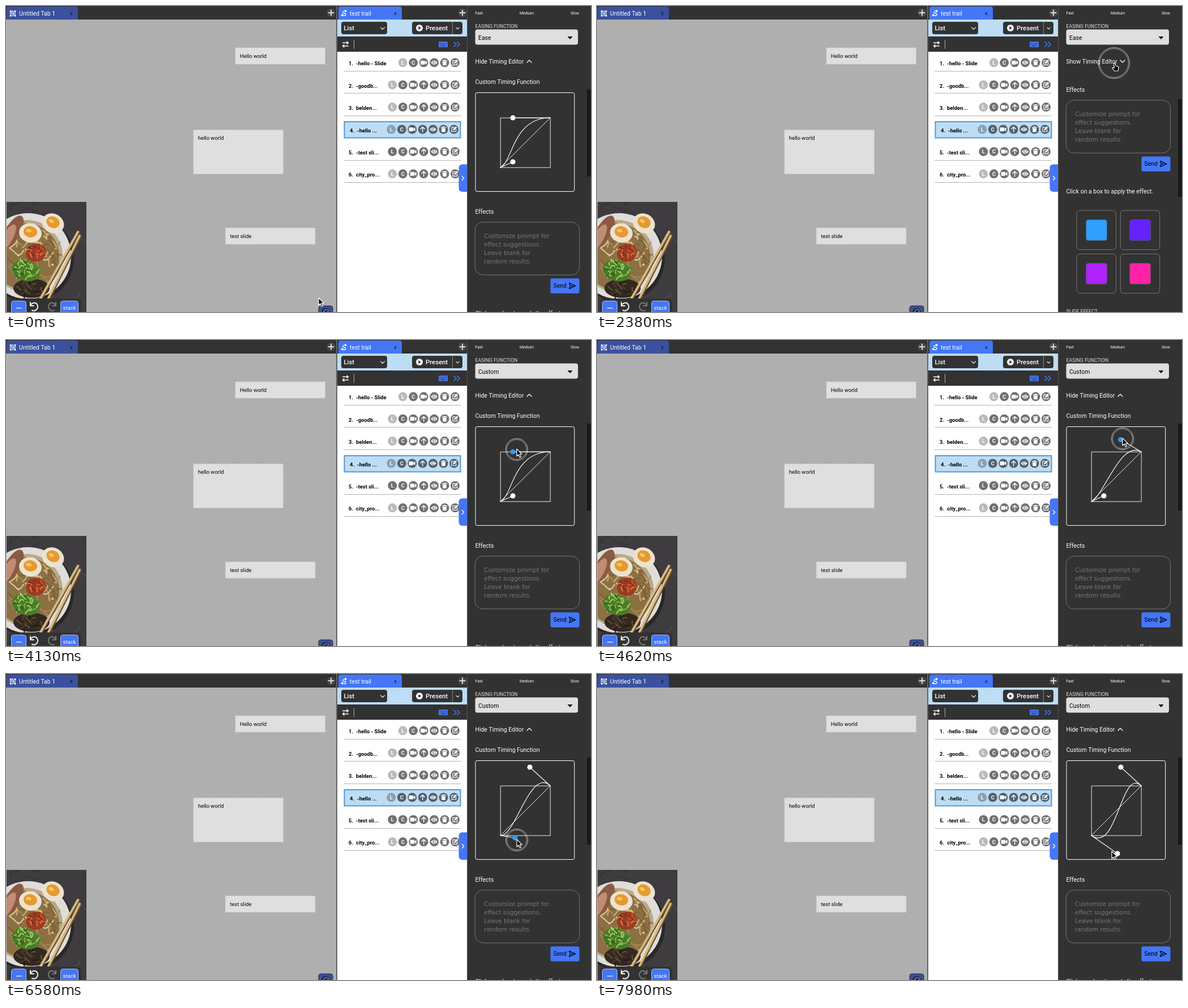
An HTML page with a canvas that plays this animation: 1033 by 542 pixels, repeating every 8000 ms.

```html
<!DOCTYPE html>
<html lang="en">
<head>
<meta charset="utf-8">
<title>Timing editor</title>
<style>
html, body { margin: 0; width: 100%; height: 100%; overflow: hidden; background: #323232; }
canvas { display: block; }
</style>
</head>
<body>
<canvas id="stage" width="1033" height="542"></canvas>
<script>
const ctx = document.getElementById('stage').getContext('2d');
const LOOP = 8000, STEP = 70;
const DARK = '#323232', BLUE = '#4476f7', PALE = '#bdddf5', DOC = '#dfdfdf';

const move = (from, to, x, y) => ({ from, to, x, y });
const press = (from, to, r = 20) => ({ from, to, r });
const during = (span, t) => t >= span.from && t < span.to;

// Each move glides from wherever the pointer rests to its own end point.
const MOVES = [
  move(0, 70, 731, 400), move(140, 840, 915, 130), move(1320, 1610, 909, 101), move(1820, 2100, 913, 100),
  move(2800, 3150, 936, 135), move(3150, 3640, 896, 197), move(4060, 4900, 932, 171), move(4900, 5320, 926, 164),
  move(5530, 5740, 897, 293), move(5950, 6230, 897, 274), move(6440, 6580, 902, 293), move(6580, 7280, 921, 316),
  move(7910, 7980, 909, 314)
];
const DRAG_END = press(3850, 5460), DRAG_START = press(6300, 7630);
const COLLAPSED = { from: 1890, to: 2520 };
const PRESSES = [press(980, 1120), press(1750, 1890, 28), press(2310, 2590, 28), DRAG_END, DRAG_START];

const easeOut = p => 1 - (1 - p) ** 2;

function pointerAt(t) {
  let x = 552, y = 517;
  for (const m of MOVES) {
    if (t <= m.from) break;
    const p = easeOut(Math.min(1, (t - m.from) / (m.to - m.from)));
    x += (m.x - x) * p;
    y += (m.y - y) * p;
  }
  return [x, y];
}

// A dragged handle trails the pointer by one step and stays where it was let go.
function handleAt(t, drag, dx, dy) {
  const [x, y] = pointerAt(Math.max(drag.from, Math.min(drag.to, t)) - STEP);
  return [x + dx, y + dy];
}

let seed = 1;
function rand(a, b) {
  seed = (seed * 16807) % 2147483647;
  return a + (b - a) * seed / 2147483647;
}

function rect(x, y, w, h, fill) {
  ctx.fillStyle = fill;
  ctx.fillRect(x, y, w, h);
}

function box(x, y, w, h, r, fill, stroke, width = 1) {
  ctx.beginPath();
  ctx.roundRect(x, y, w, h, r);
  if (fill) { ctx.fillStyle = fill; ctx.fill(); }
  if (stroke) { ctx.strokeStyle = stroke; ctx.lineWidth = width; ctx.stroke(); }
}

function oval(x, y, rx, ry, fill, angle = 0) {
  ctx.beginPath();
  ctx.ellipse(x, y, rx, ry, angle, 0, 7);
  ctx.fillStyle = fill;
  ctx.fill();
}

const disc = (x, y, r, fill) => oval(x, y, r, r, fill);

function ring(x, y, r, color) {
  ctx.beginPath();
  ctx.arc(x, y, r, 0, 7);
  ctx.strokeStyle = color;
  ctx.lineWidth = 1;
  ctx.stroke();
}

// Strokes and/or fills an SVG path placed at x, y
function icon(d, x, y, stroke, width = 1.5, fill) {
  ctx.save();
  ctx.translate(x, y);
  ctx.lineCap = ctx.lineJoin = 'round';
  const path = new Path2D(d);
  if (fill) { ctx.fillStyle = fill; ctx.fill(path); }
  if (stroke) { ctx.strokeStyle = stroke; ctx.lineWidth = width; ctx.stroke(path); }
  ctx.restore();
}

// y is the middle of the capitals
function text(s, x, y, size = 10.45, color = '#fff', weight = 400, family = 'Roboto') {
  ctx.font = `${weight} ${size}px ${family}, sans-serif`;
  ctx.fillStyle = color;
  ctx.fillText(s, x, y + size * 0.355);
}

// Short random strokes spread over an ellipse
function strands(count, x, y, rx, ry, length, colors) {
  for (let i = 0; i < count; i++) {
    const a = rand(0, 6.28), d = Math.sqrt(rand(0, 1)), bend = rand(-length, length) / 2;
    icon(`M0 0 q${bend} ${bend} ${rand(-length, length)} ${rand(-length, length)}`,
      x + Math.cos(a) * rx * d, y + Math.sin(a) * ry * d, colors[i % colors.length], 2);
  }
}

function photo() {
  seed = 7;
  ctx.save();
  ctx.beginPath();
  ctx.rect(1, 347, 141, 195);
  ctx.clip();
  rect(1, 347, 141, 195, '#3f3c40');
  strands(40, 72, 440, 100, 110, 18, ['#343236', '#4d4a4d', '#3a373b']);
  disc(42, 447, 78, '#29272a');
  disc(39, 443, 76, '#dfddd9');
  disc(36, 443, 64, '#b8a98a');
  disc(35, 444, 59, '#8c7044');
  strands(70, 45, 440, 48, 50, 18, ['#cdb47c', '#a58a56', '#e0cd9c', '#7d5f36']);
  oval(12, 400, 13, 32, '#8a5a44', 0.5);
  oval(3, 410, 9, 26, '#c08c72', 0.5);
  for (const [x, y, tilt] of [[43, 402, 0.2], [83, 385, 0.5]]) {
    oval(x, y, 20, 17, '#ece2d0', tilt);
    oval(x, y - 2, 12, 10, '#e59a30', tilt);
    oval(x - 3, y - 4, 5, 3, '#f8c465', tilt);
  }
  oval(53, 437, 18, 16, '#9c3c22', -0.4);
  strands(16, 53, 437, 14, 12, 9, ['#c9552d', '#7c2a19', '#d97a46']);
  oval(45, 500, 32, 17, '#33291f');
  strands(16, 45, 500, 26, 12, 10, ['#4d3c2a', '#211b16', '#65533e']);
  oval(35, 469, 25, 18, '#4a7a2a', 0.3);
  strands(40, 36, 468, 24, 17, 9, ['#86bb45', '#315f20', '#a6d265', '#578c30']);
  icon('M128 401 L60 522 M131 408 L74 522', 0, 0, '#6b5030', 5.5);
  icon('M127 400 L59 521 M130 407 L73 521', 0, 0, '#d9bb80', 3.8);
  ctx.restore();
}

function tab(x, w, fill, label, labelX) {
  box(x, 1, w, 23, [4, 4, 0, 0], fill);
  text(label, labelX, 13);
  text('x', x + w - 14, 13, 9.5, '#111');
}

function plus(x) {
  disc(x, 12, 7.5, '#484848');
  icon('M-4.5 0 H4.5 M0 -4.5 V4.5', x, 12, '#ddd', 2);
}

function note(s, x, y, h) {
  box(x, y, 158.5, h, 0, DOC, '#cfcfcf', 0.6);
  text(s, x + 8, y + 14.5, 9.4, '#000');
}

function toolButton(x, w) {
  box(x, 522.5, w, 30, 4, BLUE, '#a9c3ff');
}

function leftPane() {
  rect(0, 24, 583, 518, '#afafaf');
  for (let y = 51; y < 542; y += 39.7)
    for (let x = 7.5; x < 580; x += 39.7) rect(Math.round(x), Math.round(y), 1, 1, '#858585');

  tab(1, 126, '#3b519f', 'Untitled Tab 1', 23);
  icon('M-4 -4 H4 V4 H-4Z M-2 -2 H1 V1 H-2Z M0 2 H2 V-1', 12, 13, '#fff', 1);
  for (const x of [7, 15]) for (const y of [8, 16]) rect(x, y, 2.5, 2.5, '#fff');
  plus(574);

  note('Hello world', 405, 74, 29);
  note('hello world', 331, 219.5, 78);
  note('test slide', 387.5, 393, 29);

  photo();
  box(5, 518, 128, 40, 8, DARK);
  toolButton(9.5, 26);
  rect(18, 534.5, 10, 1.2, '#fff');
  const undo = 'M-7 -8 V-2 H-1 M-7 -3 Q-3 -8 2 -7 A7 7 0 1 1 -4 6';
  icon(undo, 50, 533, '#eee', 2);
  ctx.save();
  ctx.scale(-1, 1);
  icon(undo, -81, 533, '#777', 2);
  ctx.restore();
  toolButton(96.5, 31);
  text('stack', 100.5, 535, 9.5);

  box(552, 531, 25, 20, 4, '#3a4e92', '#2b3147');
  disc(565, 543, 8, '#20283f');
  icon('M-5 0 Q-2 -7 4 -5 M1 0 L6 -4', 565, 543, '#6d98ff', 1.2);
}

const GLYPHS = {
  video: [['M-5 -3 H1.5 V3 H-5Z M2.5 -1 L5 -2.7 V2.7 L2.5 1Z', '#fff', 0.8, '#fff']],
  up: [['M0 4.5 V-4 M-3.6 -0.7 L0 -4.3 L3.6 -0.7', '#fff', 1.4]],
  eye: [['M-5.5 0 Q0 -7 5.5 0 Q0 7 -5.5 0Z', '#fff', 0.5, '#fff'], ['M-2.2 0 a2.2 2.2 0 1 0 4.4 0 a2.2 2.2 0 1 0 -4.4 0Z', '#666', 1]],
  trash: [['M-4.2 -3.6 H4.2 M-1.2 -4.6 H1.2', '#fff', 1.2], ['M-3.3 -2 H3.3 L2.8 4.5 H-2.8Z', '#fff', 0.5, '#fff']],
  edit: [['M1 -3.6 H-4 V4 H3.6 V0', '#fff', 1.2], ['M-1.5 1.5 L-1 -0.8 L3.4 -5 L5 -3.3 L0.8 1Z', '#fff', 0.5, '#fff']]
};

function badge(kind, x, y, alpha) {
  disc(x, y, 8, `rgba(0,0,0,${alpha})`);
  if (kind.length === 1) {
    ctx.textAlign = 'center';
    text(kind, x, y, 9.5, '#fff', 700);
    ctx.textAlign = 'left';
  } else for (const [d, stroke, width, fill] of GLYPHS[kind]) icon(d, x, y, stroke, width, fill);
}

function trailRow(name, i) {
  const y = 100.7 + i * 39.4, picked = i === 3, shift = picked ? 2 : 0;
  if (picked) box(597.5, 205, 205, 28.5, 0, PALE, '#5799cf', 2);
  else rect(596, Math.round(y + 14.2), 207, 1, '#b3b3b3');
  text(`${i + 1}.`, 605 + shift, y + 1.4, 9.4, '#000', 700);
  text(name, 618 + shift, y + 1.4, 9.4, '#000', 700);
  const kinds = ['L', 'C', 'video', 'up', 'eye', 'trash', 'edit'].filter(k => i || k !== 'up');
  kinds.reverse().forEach((kind, n) =>
    badge(kind, 793 - shift - n * 18.45, y - 0.4, kind === 'L' && i !== 4 ? 0.27 : 0.56));
}

function trailPane() {
  rect(583, 0, 2, 542, '#646464');
  rect(585, 24, 229, 30, PALE);
  rect(585, 54, 229, 27, DARK);
  rect(585, 81, 229, 461, '#fff');
  tab(587, 112, BLUE, 'test trail', 607);
  disc(593.5, 16, 1.8, '#fff');
  icon('M-3 4 H3 Q5 3 3 0 H0 Q-3 -2 1 -4', 596, 13, '#fff', 1.3);
  disc(599.5, 9, 2, '#fff');
  plus(806);

  box(592, 28, 81, 22, 4, DARK);
  text('List', 596.5, 39.2, 11.2, '#fff', 500);
  icon('M-3.5 -1.7 L0 1.8 L3.5 -1.7', 665, 39.5, '#fff', 1.2);
  box(717, 28, 89, 22, 4, DARK);
  rect(788, 28, 1, 22, '#888');
  disc(730, 39, 6, '#fff');
  icon('M-1.7 -3 L3 0 L-1.7 3Z', 730, 39, null, 0, DARK);
  text('Present', 741, 39, 11.3, '#fff', 500);
  icon('M-2.5 -1.2 L0 1.3 L2.5 -1.2', 797.5, 39.5, '#fff', 1.1);

  icon('M-5 -2.7 H5 M2.5 -5 L5 -2.7 L2.5 -0.5 M5 2.7 H-5 M-2.5 0.5 L-5 2.7 L-2.5 5', 599.5, 68, '#fff', 1.5);
  rect(614, 60, 1, 16, '#aaa');
  box(764, 63, 16, 10, 1.5, BLUE);
  for (let n = 0; n < 10; n++) rect(766 + (n % 5) * 2.7, n < 5 ? 65 : 67.5, 1.2, 1.3, DARK);
  rect(768, 70, 8, 1.2, DARK);
  icon('M-5 -4 L-1 0 L-5 4 M1 -4 L5 0 L1 4', 796, 68, BLUE, 1.7);

  ['-hello - Slide', '-goodb...', 'belden...', '-hello ...', '-test sli...', 'city_pro...'].forEach(trailRow);
  box(799.5, 280.5, 15, 48.5, [6, 0, 0, 6], BLUE);
  icon('M-1.7 -3.5 L1.7 0 L-1.7 3.5', 807, 305, '#fff', 1.3);
}

function timingGraph(t) {
  const start = handleAt(t, DRAG_START, -2, 2), end = handleAt(t, DRAG_END, -1, 1);
  const grip = ([x, y], drag) => disc(x, y, 4.6, during(drag, t) ? '#2f9bf5' : '#fff');
  text('Custom Timing Function', 828.5, 134.5);
  box(829, 153.5, 174.7, 175, 3, null, '#fff');
  box(873.2, 198.2, 88, 88, 0, null, '#fff', 0.9);
  icon('M873 286 L961 198', 0, 0, '#fff', 0.9);
  icon(`M873 286 L${start} M961 198 L${end}`, 0, 0, '#fff', 1.1);
  icon(`M873 286 C${start} ${end} 961 198`, 0, 0, '#fff', 1.2);
  grip(start, DRAG_START);
  grip(end, DRAG_END);
}

function effects(top) {
  text('Effects', 828.5, top);
  box(828.2, top + 18.5, 184.5, 93.5, 14, null, '#777');
  ['Customize prompt for', 'effect suggestions.', 'Leave blank for', 'random results.'].forEach((s, i) =>
    text(s, 844, top + 43 + i * 15.1, 10.6, '#777', 400, '"DejaVu Sans"'));
  box(961.5, top + 118.2, 51, 26.5, 3, BLUE);
  text('Send', 966.5, top + 131.3, 10.4, '#000');
  icon('M-5 -5 L6 0 L-5 5 L-3 0Z M-3 0 H1', 999.5, top + 131.3, '#000', 1.2);
  text('Click on a box to apply the effect.', 828.5, top + 180);
  ['#2ea0ff', '#6422ff', '#ae22fb', '#ff22a8'].forEach((color, i) => {
    const x = 847 + (i % 2) * 77.2, y = top + 213.7 + (i >> 1) * 77.2;
    box(x, y, 69.5, 69.5, 6, null, '#777');
    box(x + 16.5, y + 16.5, 37, 37, 4, color, '#555');
  });
  text('SLIDE EFFECT', 828.5, top + 392.5, 8.75, '#ddd');
}

function editorPane(t) {
  const open = !during(COLLAPSED, t);
  rect(814, 0, 219, 542, DARK);
  rect(814, 0, 1, 542, '#555');
  rect(1026, open ? 148 : 165, 7, open ? 154 : 173, '#191919');
  text('Fast', 828.5, 12.5, 6.9);
  text('Medium', 907, 12.5, 6.9);
  text('Slow', 997, 12.5, 6.9);
  text('EASING FUNCTION', 828.5, 35.7, 8.75, '#ddd');
  box(828.5, 41.5, 181.5, 27, 4, DOC);
  text(t < 4130 ? 'Ease' : 'Custom', 834, 56, 10.45, '#000');
  icon('M-4.5 -2.5 H4.5 L0 2.5Z', 996, 56.5, null, 0, '#000');
  text(`${open ? 'Hide' : 'Show'} Timing Editor`, 828.5, 98);
  icon(open ? 'M-4 2 L0 -2 L4 2' : 'M-4 -2 L0 2 L4 -2', open ? 924 : 928, 98, '#fff', 1.3);
  if (open) timingGraph(t);
  effects(open ? 364.3 : 148.3);
}

function pointer(t) {
  const [x, y] = pointerAt(t), pressed = PRESSES.find(p => during(p, t));
  if (pressed) {
    ring(x, y + 1, pressed.r - 0.5, 'rgba(255,255,255,.65)');
    ring(x, y + 1, pressed.r - 2.5, 'rgba(255,255,255,.55)');
  }
  const overToggle = y > 90 && y < 106;
  if (overToggle) {
    icon('M-1 2 Q0 0 1.5 2 L2.5 6 L6 7 Q8 7.5 7.5 10 L6.5 15 H0 L-3.5 10.5 Q-4 8.5 -1.5 9.5 L0 10Z', x + 0.5, y, '#fff', 1.2, '#000');
  } else {
    icon('M0 0 V13 L3 10.2 L5.2 15 L7.4 14 L5.2 9.4 H9.3Z', x, y, '#fff', 1.2, '#000');
  }
}

function draw(t) {
  rect(0, 0, 1033, 542, DARK);
  leftPane();
  trailPane();
  editorPane(t);
  pointer(t);
}

function tick() {
  const t = performance.now() % LOOP;
  draw(Math.floor(t / STEP) * STEP);
  requestAnimationFrame(tick);
}
tick();
</script>
</body>
</html>
```
